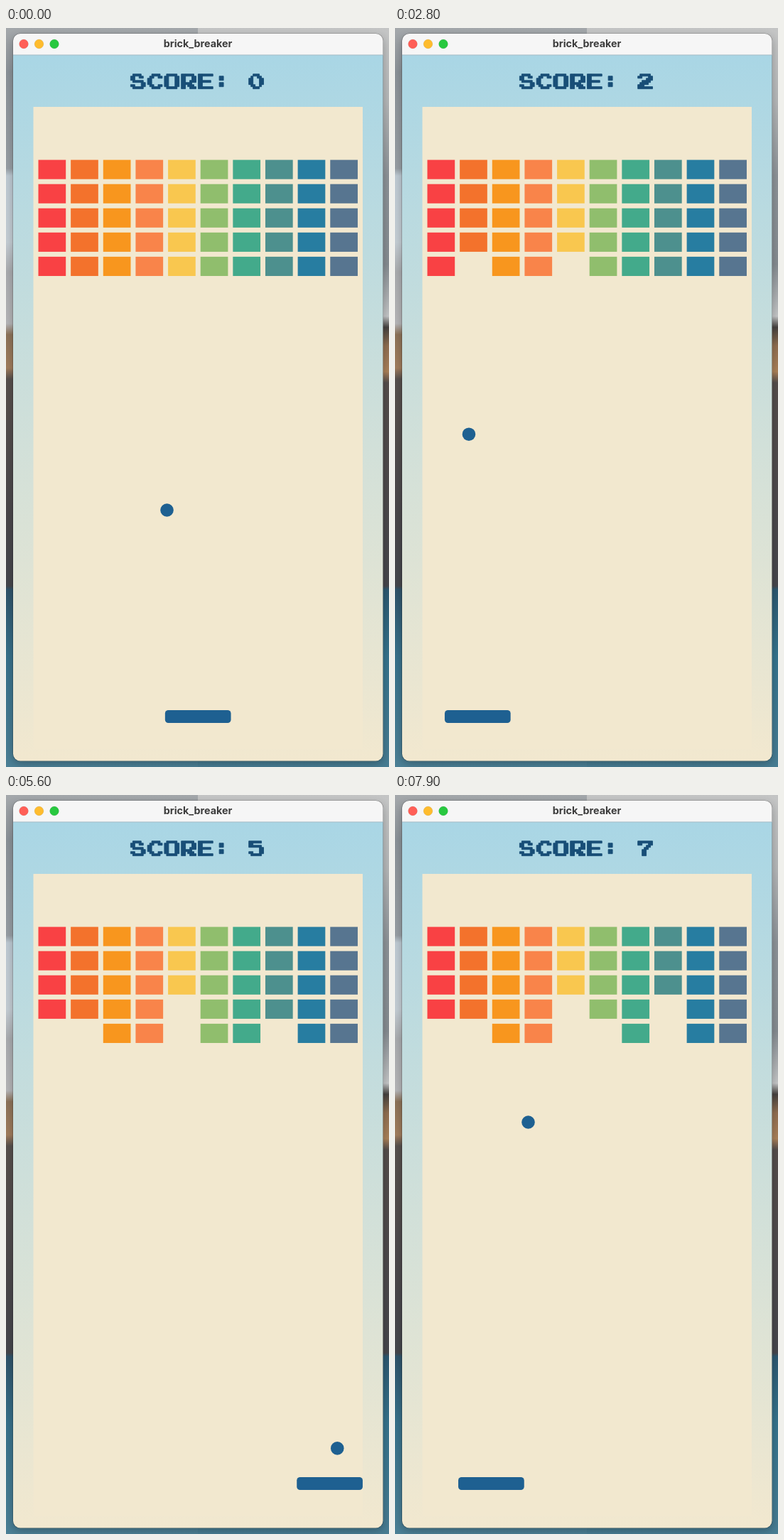
An HTML page for the animation above (8 s loop, 539 px wide and 1040 px high).

```html
<!DOCTYPE html>
<html lang="en">
<head>
<meta charset="utf-8">
<title>brick_breaker</title>
<style>
  html, body { margin: 0; width: 100%; height: 100%; overflow: hidden; }
  svg { display: block; width: 100vw; height: 100vh; }
  .title { font: 700 14.3px Inter, sans-serif; fill: #3c3c3c; text-anchor: middle; }
  .score { fill: #184e77; stroke: #184e77; stroke-width: .3; }
</style>
</head>
<body>
<svg viewBox="0 0 539 1040">
  <defs>
    <linearGradient id="left" x2="0" y2="1">
      <stop offset="0" stop-color="#a4a8ab"/><stop offset=".06" stop-color="#8a9197"/>
      <stop offset=".19" stop-color="#969da3"/><stop offset=".2" stop-color="#bdc9d2"/>
      <stop offset=".29" stop-color="#c3ccd3"/><stop offset=".33" stop-color="#a9abae"/>
      <stop offset=".4" stop-color="#b4b4b6"/><stop offset=".415" stop-color="#8c7258"/>
      <stop offset=".46" stop-color="#a07c5c"/><stop offset=".475" stop-color="#57504d"/>
      <stop offset=".66" stop-color="#4a474b"/><stop offset=".755" stop-color="#45464c"/>
      <stop offset=".76" stop-color="#2f536a"/><stop offset=".85" stop-color="#37708a"/>
      <stop offset="1" stop-color="#4b7f95"/>
    </linearGradient>
    <linearGradient id="right" x2="0" y2="1">
      <stop offset="0" stop-color="#c4c5c5"/><stop offset=".1" stop-color="#b4b6b7"/>
      <stop offset=".2" stop-color="#8c9297"/><stop offset=".32" stop-color="#858b90"/>
      <stop offset=".39" stop-color="#c2c4c5"/><stop offset=".405" stop-color="#45423f"/>
      <stop offset=".43" stop-color="#8f6e50"/><stop offset=".465" stop-color="#a98058"/>
      <stop offset=".48" stop-color="#544d4b"/><stop offset=".755" stop-color="#46464b"/>
      <stop offset=".76" stop-color="#2c5870"/><stop offset=".85" stop-color="#35738c"/>
      <stop offset="1" stop-color="#477c92"/>
    </linearGradient>
    <linearGradient id="sky" x2="0" y2="1">
      <stop offset="0" stop-color="#a9d6e5"/><stop offset="1" stop-color="#f2e8cf"/>
    </linearGradient>
    <clipPath id="frame"><rect x="10" y="8" width="520.5" height="1023.5" rx="10"/></clipPath>
    <filter id="shadow" x="-10%" y="-10%" width="120%" height="120%"><feGaussianBlur stdDeviation="6"/></filter>
  </defs>

  <rect width="270" height="1040" fill="url(#left)"/>
  <rect x="270" width="269" height="1040" fill="url(#right)"/>
  <rect x="10" y="12" width="520.5" height="1023" rx="10" opacity=".25" filter="url(#shadow)"/>
  <rect x="9.5" y="7.5" width="521.5" height="1024.5" rx="10.5" opacity=".3"/>

  <g clip-path="url(#frame)">
    <rect x="10" y="38" width="521" height="994" fill="url(#sky)"/>
    <rect x="10" y="8" width="521" height="30" fill="#f6f6f6"/>
    <rect x="10" y="37.5" width="521" height="1" fill="#a5bcc5"/>
  </g>
  <g stroke="#000" stroke-opacity=".12" stroke-width=".6">
    <circle cx="25" cy="22.5" r="6.4" fill="#ff5f57"/>
    <circle cx="46.5" cy="22.5" r="6.4" fill="#febc2e"/>
    <circle cx="68" cy="22.5" r="6.4" fill="#28c840"/>
  </g>
  <text class="title" x="270" y="27.2">brick_breaker</text>
  <g id="score" class="score" role="img" transform="translate(175.4 64.8) scale(2.97)"></g>

  <rect x="38.5" y="111" width="463.5" height="904" fill="#f2e8cf"/>
  <g id="bricks"></g>
  <circle id="ball" r="9.3" fill="#1e6091"/>
  <rect id="paddle" y="960" width="92.7" height="18.1" rx="4.6" fill="#1e6091"/>
</svg>
<script>
const LOOP = 8000, STEP = 100;
const byId = id => document.getElementById(id);

function add(parent, tag, attrs) {
  const node = document.createElementNS('http://www.w3.org/2000/svg', tag);
  for (const key in attrs) node.setAttribute(key, attrs[key]);
  return parent.appendChild(node);
}

// Blocky letterforms on a 7-unit square.
const GLYPHS = {
  S: 'M1 0h4v1H1zM0 1h2v2H0zM4 1h2v1H4zM1 3h5v1H1zM5 4h2v2H5zM0 5h2v1H0zM1 6h5v1H1z',
  C: 'M2 0h4v1H2zM1 1h2v1H1zM5 1h2v1H5zM0 2h2v3H0zM1 5h2v1H1zM5 5h2v1H5zM2 6h4v1H2z',
  O: 'M1 0h5v1H1zM0 1h2v5H0zM5 1h2v5H5zM1 6h5v1H1z',
  R: 'M0 0h2v7H0zM2 0h4v1H2zM5 1h2v2H5zM4 3h3v1H4zM2 4h3v1H2zM3 5h3v1H3zM4 6h3v1H4z',
  E: 'M0 0h2v7H0zM2 0h5v1H2zM2 3h4v1H2zM2 6h5v1H2z',
  ':': 'M2 1h2v2H2zM2 4h2v2H2z',
  0: 'M2 0h3v1H2zM1 1h1v1H1zM4 1h2v1H4zM0 2h2v3H0zM5 2h2v3H5zM1 5h2v1H1zM5 5h1v1H5zM2 6h3v1H2z',
  1: 'M3 0h2v6H3zM2 1h1v1H2zM1 6h6v1H1z',
  2: 'M1 0h5v1H1zM0 1h2v1H0zM5 1h2v1H5zM4 2h3v1H4zM2 3h4v1H2zM1 4h4v1H1zM0 5h3v1H0zM0 6h7v1H0z',
  3: 'M1 0h6v1H1zM4 1h2v1H4zM3 2h2v1H3zM2 3h4v1H2zM5 4h2v2H5zM0 5h2v1H0zM1 6h5v1H1z',
  4: 'M3 0h3v1H3zM2 1h2v1H2zM4 1h2v6H4zM1 2h2v1H1zM0 3h2v1H0zM0 4h7v1H0z',
  5: 'M0 0h6v1H0zM0 1h2v1H0zM0 2h6v1H0zM5 3h2v3H5zM0 5h2v1H0zM1 6h5v1H1z',
  6: 'M2 0h4v1H2zM1 1h2v1H1zM0 2h2v4H0zM2 3h4v1H2zM5 4h2v2H5zM1 6h5v1H1z',
  7: 'M0 0h7v1H0zM0 1h2v1H0zM5 1h2v1H5zM4 2h2v1H4zM3 3h2v1H3zM2 4h2v3H2z'
};

const COLORS = ['#f94144', '#f3722c', '#f8961e', '#f9844a', '#f9c74f',
                '#90be6d', '#43aa8b', '#4d908e', '#277da1', '#577590'];

// Turning points of the ball: time, x, y, and the column and row of a brick it breaks.
const BALL = [
  [0, 226.5, 678.5], [260, 123.8, 951], [538, 48, 660],
  [826, 126.3, 358, 1, 4], [1376, 280.4, 951],
  [1925, 244, 358, 4, 4], [2459, 207.7, 951], [2984, 48, 367],
  [2992, 50.5, 358, 0, 4], [3510, 212.7, 951],
  [4054, 242.5, 324, 4, 3], [4586, 272.5, 951],
  [5089, 394.3, 358, 7, 4], [5485, 493, 839], [5574, 470, 951],
  [6090, 395.8, 324, 7, 3], [6586, 322.3, 951],
  [7064, 274, 358, 5, 4], [7519, 225.5, 951], [7900, 187.5, 460.5]
];
// Time and centre of the paddle.
const PADDLE = [
  [0, 270.2], [250, 107.3], [650, 107.3], [1350, 326], [1800, 326], [2430, 239.5],
  [2800, 116.3], [2980, 116.3], [3500, 247.6], [4620, 247.6], [5450, 455.6],
  [5750, 455.6], [6300, 403], [6586, 316], [6900, 347.5], [7200, 185.5],
  [7500, 228], [7900, 135.4]
];
const HITS = BALL.filter(point => point.length > 3);

const linear = p => p;
const smooth = p => p * p * (3 - 2 * p);

function sample(track, t, ease) {
  const next = Math.max(1, track.findIndex(point => point[0] >= t));
  const a = track[next - 1], b = track[next];
  const p = ease((t - a[0]) / (b[0] - a[0]));
  return [1, 2].map(i => a[i] + (b[i] - a[i]) * p);
}

const bricks = COLORS.map((fill, col) => Array.from({ length: 5 }, (_, row) =>
  add(byId('bricks'), 'rect', {
    x: 45.5 + col * 45.64, y: 185.6 + row * 34.07, width: 38.7, height: 27.1, fill
  })));

const letters = [...'SCORE: 0'].map((char, i) =>
  add(byId('score'), 'path', { d: GLYPHS[char] || '', transform: `translate(${i * 8})` }));

function draw(t) {
  const [x, y] = sample(BALL, t, linear);
  byId('ball').setAttribute('cx', x);
  byId('ball').setAttribute('cy', y);
  byId('paddle').setAttribute('x', sample(PADDLE, t, smooth)[0] - 46.35);

  let score = 0;
  for (const [time, , , col, row] of HITS) {
    const broken = t >= time;
    bricks[col][row].setAttribute('visibility', broken ? 'hidden' : 'visible');
    score += broken;
  }
  letters[7].setAttribute('d', GLYPHS[score]);
  byId('score').setAttribute('aria-label', `SCORE: ${score}`);
}

const start = performance.now();
function tick() {
  const elapsed = (performance.now() - start) % LOOP;
  draw(Math.floor(elapsed / STEP) * STEP);
  requestAnimationFrame(tick);
}
tick();
</script>
</body>
</html>
```
